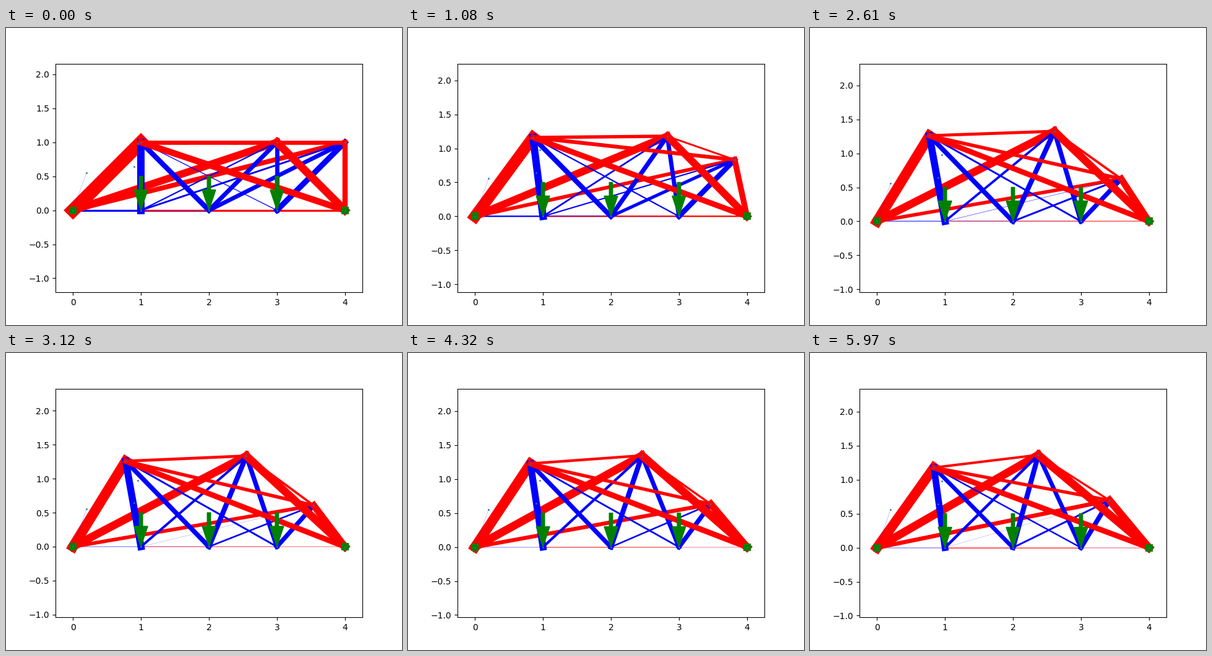
Write a matplotlib script that moves like this. It is 640 by 480 pixels and loops after 6 s.

```python
from itertools import combinations

import matplotlib.pyplot as plt
import numpy as np
from matplotlib.animation import FuncAnimation

FRAMES, INTERVAL = 200, 30
SCALE = 109.86              # pixels per data unit
FORCE_WIDTH = 10            # points of line width per unit force

BASE = np.array([[x, 0.0] for x in range(5)])
SUPPORTS, LOADED = (0, 4), (1, 2, 3)
IDLE = np.array([[0.2, 0.556], [0.9, 0.643], [0.955, 0.978]])

# x, y of the three movable joints as the shape is optimised
STEPS = np.array([0, 36, 64, 87, 121, 168, 199])
PATH = np.array([
    [1.000, 1.000, 3.000, 1.000, 4.000, 1.000],
    [0.853, 1.160, 2.829, 1.179, 3.820, 0.833],
    [0.798, 1.238, 2.700, 1.283, 3.684, 0.692],
    [0.771, 1.260, 2.610, 1.325, 3.593, 0.624],
    [0.789, 1.247, 2.500, 1.338, 3.502, 0.607],
    [0.839, 1.204, 2.423, 1.355, 3.447, 0.667],
    [0.838, 1.178, 2.373, 1.364, 3.420, 0.696],
])
SLOPE = np.gradient(PATH, STEPS, axis=0, edge_order=2)

BARS = list(combinations(range(8), 2))
FREE = [n for n in range(8) if n not in SUPPORTS]


def joints(i):
    """All joint positions at step i (cubic Hermite through PATH)."""
    k = min(np.searchsorted(STEPS, i, side="right") - 1, len(STEPS) - 2)
    h = STEPS[k + 1] - STEPS[k]
    s = (i - STEPS[k]) / h
    top = ((1 + 2 * s) * (1 - s) ** 2 * PATH[k]
           + s * (1 - s) ** 2 * h * SLOPE[k]
           + s * s * (3 - 2 * s) * PATH[k + 1]
           + s * s * (s - 1) * h * SLOPE[k + 1])
    return np.vstack([BASE, top.reshape(3, 2)])


def bar_forces(pos):
    """Minimum-norm bar forces in equilibrium with unit loads."""
    balance = np.zeros((8, 2, len(BARS)))
    for b, (i, j) in enumerate(BARS):
        d = pos[j] - pos[i]
        d = d / np.hypot(*d)
        balance[i, :, b] = d
        balance[j, :, b] = -d
    rhs = np.zeros((8, 2))
    rhs[list(LOADED), 1] = 1
    return np.linalg.lstsq(balance[FREE].reshape(-1, len(BARS)),
                           rhs[FREE].ravel(), rcond=None)[0]


fig = plt.figure(figsize=(6.4, 4.8), dpi=100)
ax = fig.add_subplot()
half_w, half_h = 248 / SCALE, 184.8 / SCALE
ax.set_xlim(2 - half_w, 2 + half_w)

lines = [ax.plot([], [], zorder=2)[0] for _ in BARS]
ax.plot([0, IDLE[0, 0]], [0, IDLE[0, 1]], color="blue", lw=0.15, zorder=2)
for n in LOADED:
    ax.arrow(n, 0.5, 0, -0.5, width=0.05, head_width=0.2, head_length=0.3,
             length_includes_head=True, color="green", zorder=3)
ax.plot(SUPPORTS, [0, 0], "s", color="green", ms=7, mew=1.5, zorder=4)
dots, = ax.plot([], [], "o", color="C0", ms=1, zorder=5)


def draw(i):
    pos = joints(i)
    for line, (a, b), f in zip(lines, BARS, bar_forces(pos)):
        line.set_data(pos[[a, b], 0], pos[[a, b], 1])
        line.set_linewidth(FORCE_WIDTH * abs(f))
        line.set_color("blue" if f > 0 else "red")
        line.set_visible(abs(f) > 1e-4)
    dots.set_data(*np.vstack([pos, IDLE]).T)
    mid = pos[:, 1].max() / 2 - 0.025
    ax.set_ylim(mid - half_h, mid + half_h)
    return lines + [dots]


anim = FuncAnimation(fig, draw, frames=FRAMES, interval=INTERVAL,
                     repeat=True, repeat_delay=0, blit=False)
plt.show()
```
